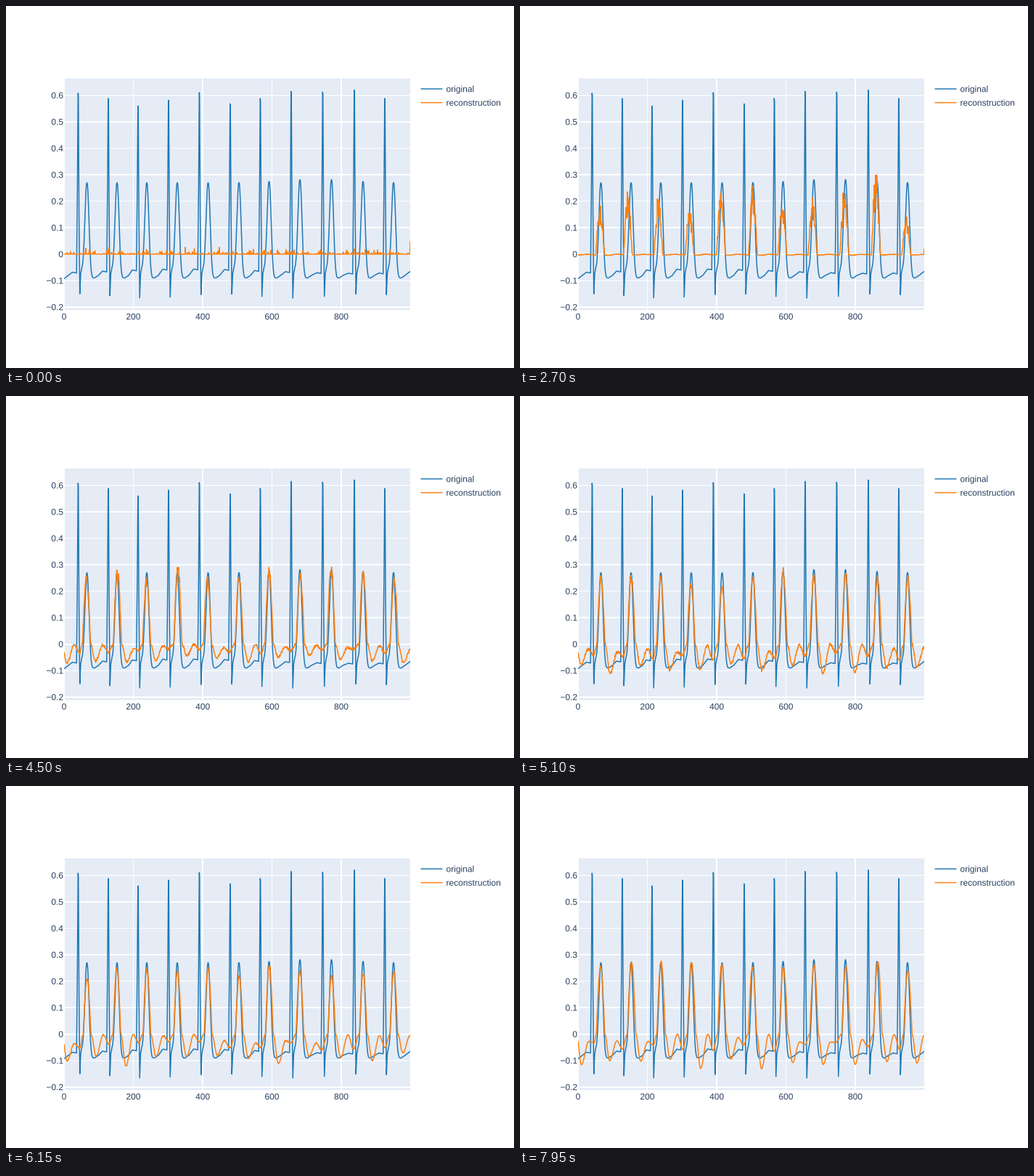
Write a matplotlib script that moves like this. It is 700x500 px and loops after 8 s.

```python
import numpy as np
import matplotlib.pyplot as plt
from matplotlib.animation import FuncAnimation
from matplotlib.patches import PathPatch, Rectangle
from matplotlib.textpath import TextPath
from matplotlib.transforms import Affine2D

WIDTH, HEIGHT, DPI = 700, 500, 100
PX = 72 / DPI
LEFT, RIGHT, TOP, BOTTOM = 80, 557, 100, 420
ZERO, UNIT = 342.75, 365.6
BLUE, ORANGE, INK = "#1f77b4", "#ff7f0e", "#2a3f5f"
INTERVAL, FRAMES, HOLD = 50, 160, 3

plt.rcParams["font.family"] = "Liberation Sans"

BEAT_X = np.array([99.5, 141, 182, 224, 266.5, 309, 350.5, 393, 436.5, 480, 522])
SPIKES = [0.608, 0.588, 0.56, 0.582, 0.61, 0.568, 0.588, 0.615, 0.612, 0.62, 0.588]
WAVE_LAG = 12
SAMPLES = 1000


def to_x(sample):
    return LEFT + sample * (RIGHT - LEFT) / (SAMPLES - 1)


def to_y(value):
    return ZERO - value * UNIT


def heartbeat():
    """Spike, drop and rounded wave for every beat, x in pixels."""
    points = [(LEFT, -0.093), (85, -0.082)]
    dx = np.arange(3.4, 23, 0.4)
    hump = np.exp(-np.abs((dx - WAVE_LAG) / 3.8) ** 2.2)
    for k, (x, spike) in enumerate(zip(BEAT_X, SPIKES)):
        rest = -0.064 + 0.008 * np.sin(2 * np.pi * (k - 1) / 11)
        drop = -0.158 - 0.008 * np.sin(2 * np.pi * (k - 1.1) / 4.7)
        wave = 0.27 + 0.013 * np.exp(-((k - 7.5) / 1.5) ** 2)
        base = np.interp(dx, [3.4, 5, 19.5], [-0.075, -0.057, -0.09])
        points += [(x - 8, rest), (x - 2.3, rest - 0.003), (x - 1.1, 0.25),
                   (x - 0.2, spike), (x + 0.2, spike - 0.01), (x + 1.1, 0.15),
                   (x + 2.2, drop)]
        points += zip(x + dx, base + (wave - base) * hump)
        points.append((x + 28, -0.08))
    points.append((RIGHT, -0.065))
    xs, values = np.array(points).T
    return xs, to_y(values)


# How the reconstruction learns: key values over the training steps
STEPS = [14, 18, 25, 34, 41, 47, 53]
LEARNING = {
    "height": [0, 0.25, 0.285, 0.262, 0.245, 0.175, 0.264],
    "spread": [0.3, 0.3, 0.1, 0.08, 0.07, 0.1, 0.04],
    "rough": [0.5, 0.45, 0.2, 0.12, 0.07, 0.07, 0.03],
    "depth": [0.003, 0.003, 0.016, 0.092, 0.092, 0.075, 0.105],
    "fuzz": [0.001, 0.002, 0.006, 0.012, 0.005, 0.002, 0.002],
    "drift": [1.5, 1.5, 0.9, 0.4, 0.3, 0.5, 0.6],
    "width": [5.5, 6, 5.6, 5.6, 5.3, 4.6, 5.8],
}
SAMPLE_X = to_x(np.arange(SAMPLES))


def ease_through(x, knots_x, knots_y):
    """Cosine interpolation through the knots."""
    i = np.clip(np.searchsorted(knots_x, x) - 1, 0, len(knots_x) - 2)
    t = np.clip((x - knots_x[i]) / (knots_x[i + 1] - knots_x[i]), 0, 1)
    return knots_y[i] + (knots_y[i + 1] - knots_y[i]) * (1 - np.cos(np.pi * t)) / 2


def reconstruction(step):
    rng = np.random.default_rng(40 + step)
    now = {name: np.interp(step, STEPS, keys) for name, keys in LEARNING.items()}
    width, depth = now["width"], now["depth"]

    # The gap before the first beat counts as a beat of its own
    centres = np.r_[BEAT_X[0] - 40, BEAT_X] + WAVE_LAG
    count = len(centres)
    lean = -1.2 * np.interp(step, [14, 18, 25, 30], [1, 1, 0.8, 0])
    centres = centres + lean + now["drift"] * rng.normal(size=count)
    heights = now["height"] * (1 + now["spread"] * rng.normal(size=count))
    heights = np.clip(heights, 0, 0.37)

    floor = -0.003 * np.interp(step, [0, 14, 18, 25], [0, 1, 1, 0])
    edge = np.full(count, floor)
    trough = -depth * np.clip(rng.normal(1, 0.16, count), 0.6, 1.4)
    crest = -depth * 0.4 * rng.random(count) ** 1.5
    dip = -depth * rng.uniform(0.3, 0.65, count)
    offsets = [-width, width, 12.5, 22.5, 30]
    knots_x = np.column_stack([centres + d for d in offsets]).ravel()
    knots_y = np.column_stack([edge, edge, trough, crest, dip]).ravel()
    if step < STEPS[0]:
        knots_y[:] = floor
    values = ease_through(SAMPLE_X, knots_x, knots_y)
    values += now["fuzz"] * rng.uniform(-0.5, 0.5, SAMPLES)

    ragged = 1 - now["rough"] * rng.random(SAMPLES)
    for centre, height in zip(centres[1:], heights[1:]):
        u = (SAMPLE_X - centre) / width
        bump = height * np.cos(u * np.pi / 2) * ragged
        values = np.where(np.abs(u) < 1, np.maximum(bump, floor), values)

    sparks = rng.exponential(0.006, SAMPLES) * (rng.random(SAMPLES) < 0.22)
    values += np.clip(sparks, 0, 0.026) * max(0, 1 - step / 15)
    values[-1] += np.interp(step, [0, 18, 25], [0.05, 0.024, 0])
    return to_y(values)


fig = plt.figure(figsize=(WIDTH / DPI, HEIGHT / DPI), dpi=DPI, facecolor="white")
ax = fig.add_axes([0, 0, 1, 1])
ax.set_xlim(0, WIDTH)
ax.set_ylim(HEIGHT, 0)
ax.axis("off")

panel = Rectangle((LEFT, TOP), RIGHT - LEFT, BOTTOM - TOP, color="#E5ECF6", lw=0)
ax.add_patch(panel)


def stroke(xs, ys, color, width):
    line, = ax.plot(xs, ys, color=color, lw=width * PX,
                    solid_capstyle="butt", snap=False)
    return line


def crisp(position):
    """Nearest half pixel, and the whole rows a thin line there touches."""
    position = round(position * 2) / 2
    return position, 1 if position % 1 else 2


def label(x, y, text, align):
    """Outlined text, so that it keeps its fractional position."""
    path = TextPath((0, 0), text, size=12)
    box = path.get_extents()
    x -= {"left": 0, "center": (box.x0 + box.x1) / 2, "right": box.x1 + 0.5}[align]
    place = Affine2D().scale(1, -1).translate(x, y) + ax.transData
    ax.add_patch(PathPatch(path, color=INK, lw=0, snap=False, transform=place))


for tick in range(0, SAMPLES, 200):
    x, width = crisp(to_x(tick))
    stroke([x, x], [TOP, BOTTOM], "white", width)
    label(x, 433, str(tick), "center")

for tenth in range(-2, 7):
    y, width = crisp(to_y(tenth / 10))
    stroke([LEFT, RIGHT], [y, y], "white", width if tenth else 2)
    text = f"{tenth / 10:.1f}".replace("-", "\u2212") if tenth else "0"
    label(79, to_y(tenth / 10) + 4.2, text, "right")

stroke(*heartbeat(), BLUE, 1.5).set_clip_path(panel)
trace = stroke(SAMPLE_X, reconstruction(0), ORANGE, 1.5)
trace.set_clip_path(panel)

for y, color, name in [(114.5, BLUE, "original"), (133.5, ORANGE, "reconstruction")]:
    stroke([571.5, 601.5], [y, y], color, 1.5)
    label(606.5, y + 4.2, name, "left")


def update(frame):
    trace.set_ydata(reconstruction(frame // HOLD))
    return [trace]


animation = FuncAnimation(fig, update, frames=FRAMES, interval=INTERVAL,
                          repeat=True, repeat_delay=0, blit=True)
plt.show()
```
